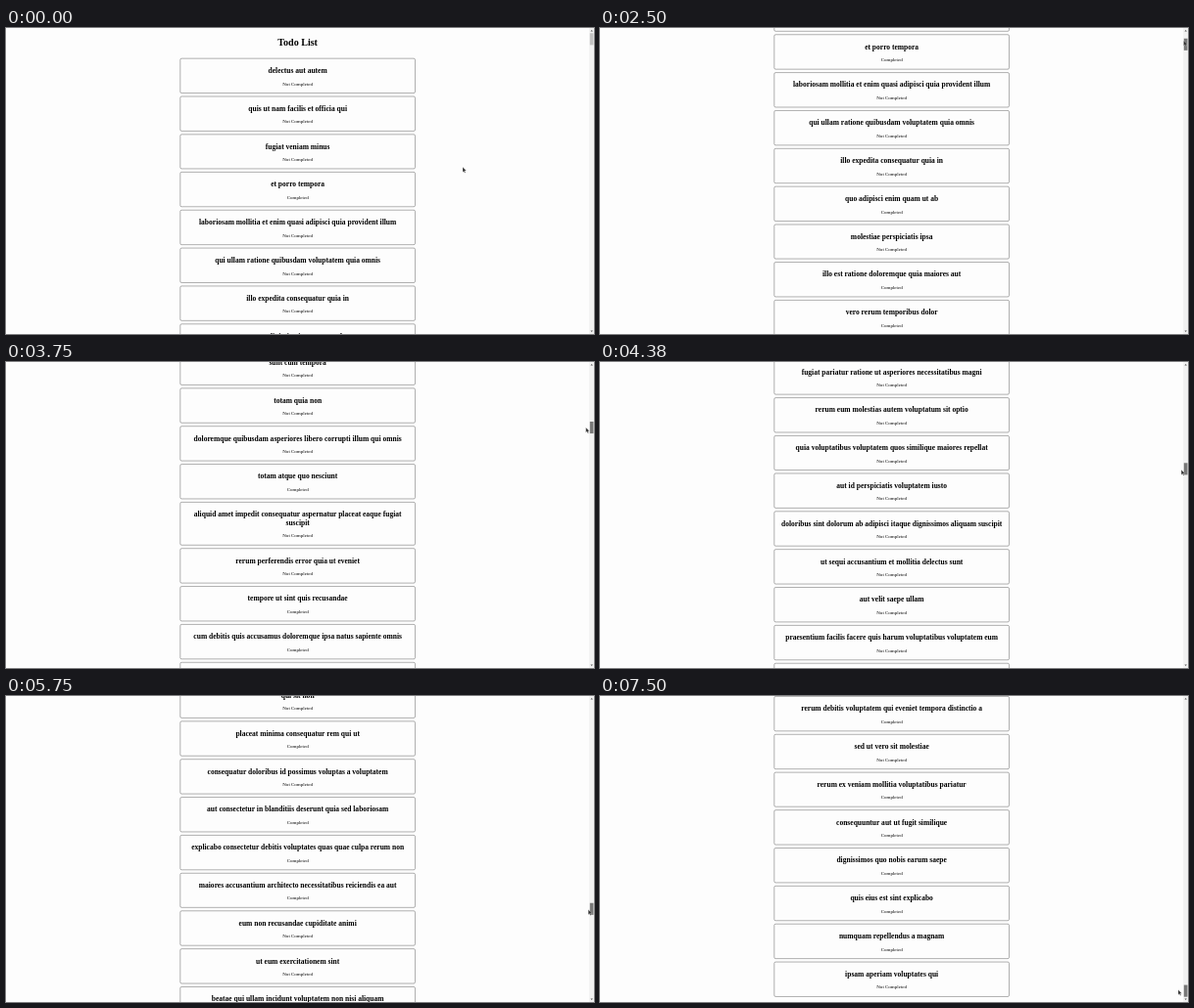
An HTML page that plays this animation: 600x313 px, repeating every 8 s.

```html
<!DOCTYPE html>
<html lang="en">
<head>
<meta charset="utf-8">
<title>Todo List</title>
<style>
  html, body { margin: 0; width: 100%; height: 100%; overflow: hidden; background: #fdfdfd; }
  #stage { position: absolute; left: 0; top: 0; width: 600px; height: 313px; overflow: hidden; }
  #page {
    position: absolute; left: 0; top: 0; width: 1900px; padding-bottom: 8px;
    display: flow-root; transform-origin: 0 0; text-align: center; color: #000;
    font: 16px/18px "Liberation Serif", "Times New Roman", serif;
  }
  h1 { margin: 29.5px 0 32.5px; font-size: 32px; line-height: 37px; }
  .todo {
    box-sizing: border-box; width: 766px; margin: 0 auto 10px; padding: 5px;
    border: 1px solid #000; border-radius: 5px; display: flow-root;
  }
  h2 { margin: 19.92px 0; font-size: 24px; line-height: 28px; }
  p { margin: 16px 0; }
  svg { position: absolute; left: 0; top: 0; }
</style>
</head>
<body>
<div id="stage">
  <div id="page"><h1>Todo List</h1></div>
  <svg width="600" height="313">
    <rect x="595.2" width="4.8" height="313" fill="#f1f1f1"/>
    <path id="up" d="M596.5 3.4l1.2-1.5 1.2 1.5z"/>
    <path d="M596.5 309.6l1.2 1.5 1.2-1.5z" fill="#505050"/>
    <rect id="thumb" x="595.8" width="3.7"/>
    <path id="cursor" d="M0 0V5.2L1.2 4.1 2 6 2.9 5.6 2.1 3.8H3.7Z" fill="#2b2b2b" stroke="#fff" stroke-width=".25"/>
  </svg>
</div>
<script>
// A leading * marks a completed todo.
const todos = `delectus aut autem
quis ut nam facilis et officia qui
fugiat veniam minus
*et porro tempora
laboriosam mollitia et enim quasi adipisci quia provident illum
qui ullam ratione quibusdam voluptatem quia omnis
illo expedita consequatur quia in
*quo adipisci enim quam ut ab
molestiae perspiciatis ipsa
*illo est ratione doloremque quia maiores aut
*vero rerum temporibus dolor
*ipsa repellendus fugit nisi
et doloremque nulla
*repellendus sunt dolores architecto voluptatum
*ab voluptatum amet voluptas
*accusamus eos facilis sint et aut voluptatem
*quo laboriosam deleniti aut qui
dolorum est consequatur ea mollitia in culpa
*molestiae ipsa aut voluptatibus pariatur dolor nihil
*ullam nobis libero sapiente ad optio sint
suscipit repellat esse quibusdam voluptatem incidunt
*distinctio vitae autem nihil ut molestias quo
et itaque necessitatibus maxime molestiae qui quas velit
adipisci non ad dicta qui amet quaerat doloribus ea
*voluptas quo tenetur perspiciatis explicabo natus
*aliquam aut quasi
*veritatis pariatur delectus
nesciunt totam sit blanditiis sit
laborum aut in quam
*nemo perspiciatis repellat ut dolor libero commodi blanditiis omnis
repudiandae totam in est sint facere fuga
earum doloribus ea doloremque quis
sint sit aut vero
porro aut necessitatibus eaque distinctio
*repellendus veritatis molestias dicta incidunt
*excepturi deleniti adipisci voluptatem et neque optio illum ad
sunt cum tempora
totam quia non
doloremque quibusdam asperiores libero corrupti illum qui omnis
*totam atque quo nesciunt
aliquid amet impedit consequatur aspernatur placeat eaque fugiat suscipit
rerum perferendis error quia ut eveniet
*tempore ut sint quis recusandae
*cum debitis quis accusamus doloremque ipsa natus sapiente omnis
velit soluta adipisci molestias reiciendis harum
vel voluptatem repellat nihil placeat corporis
nam qui rerum fugiat accusamus
sit reprehenderit omnis quia
ut necessitatibus aut maiores debitis officia blanditiis velit et
*cupiditate necessitatibus ullam aut quis dolor voluptate
distinctio exercitationem ab doloribus
nesciunt dolorum quis recusandae ad pariatur ratione
qui labore est occaecati recusandae aliquid quam
*quis et est ut voluptate quam dolor
*voluptatum omnis minima qui occaecati provident nulla voluptatem ratione
*deleniti ea temporibus enim
pariatur et magnam ea doloribus similique voluptatem rerum quia
est dicta totam qui explicabo doloribus qui dignissimos
perspiciatis velit id laborum placeat iusto et aliquam odio
*et sequi qui architecto ut adipisci
*odit optio omnis qui sunt
et placeat et tempore aspernatur sint numquam
*doloremque aut dolores quidem fuga qui nulla
voluptas consequatur qui ut quia magnam nemo esse
fugiat pariatur ratione ut asperiores necessitatibus magni
rerum eum molestias autem voluptatum sit optio
quia voluptatibus voluptatem quos similique maiores repellat
aut id perspiciatis voluptatem iusto
doloribus sint dolorum ab adipisci itaque dignissimos aliquam suscipit
ut sequi accusantium et mollitia delectus sunt
aut velit saepe ullam
praesentium facilis facere quis harum voluptatibus voluptatem eum
*sint amet quia totam corporis qui exercitationem commodi
expedita tempore nobis eveniet laborum maiores
occaecati adipisci est possimus totam
*sequi dolorem sed
maiores aut nesciunt delectus exercitationem vel assumenda eligendi at
reiciendis est magnam amet nemo iste recusandae impedit quaerat
*eum ipsa maxime ut
*tempore molestias dolores rerum sequi voluptates ipsum consequatur
*suscipit qui totam
voluptates eum voluptas et dicta
*quidem at rerum quis ex aut sit quam
sunt veritatis ut voluptate
*et quia ad iste a
*incidunt ut saepe autem
*laudantium quae eligendi consequatur quia et vero autem
vitae aut excepturi laboriosam sint aliquam et et accusantium
*sequi ut omnis et
*molestiae nisi accusantium tenetur dolorem et
*nulla quis consequatur saepe qui id expedita
*in omnis laboriosam
*odio iure consequatur molestiae quibusdam necessitatibus quia sint
facilis modi saepe mollitia
*vel nihil et molestiae iusto assumenda nemo quo ut
nobis suscipit ducimus enim asperiores voluptas
dolorum laboriosam eos qui iure aliquam
*debitis accusantium ut quo facilis nihil quis sapiente necessitatibus
neque voluptates ratione
excepturi a et neque qui expedita vel voluptate
explicabo enim cumque porro aperiam occaecati minima
sed ab consequatur
non sunt delectus illo nulla tenetur enim omnis
excepturi non laudantium quo
*totam quia dolorem et illum repellat voluptas optio
*ad illo quis voluptatem temporibus
praesentium facilis omnis laudantium fugit ad iusto nihil nesciunt
*a eos eaque nihil et exercitationem incidunt delectus
*autem temporibus harum quisquam in culpa
*aut aut ea corporis
magni accusantium labore et id quis provident
consectetur impedit quisquam qui deserunt non rerum consequuntur eius
quia atque aliquam sunt impedit voluptatum rerum assumenda nisi
cupiditate quos possimus corporis quisquam exercitationem beatae
sed et ea eum
*ipsa dolores vel facilis ut
sequi quae est et qui qui eveniet asperiores
quia modi consequatur vero fugiat
corporis ducimus ea perspiciatis iste
dolorem laboriosam vel voluptas et aliquam quasi
*inventore aut nihil minima laudantium hic qui omnis
*provident aut nobis culpa
esse et quis iste est earum aut impedit
qui consectetur id
aut quasi autem iste tempore illum possimus
*ut asperiores perspiciatis veniam ipsum rerum saepe
*voluptatem libero consectetur rerum ut
eius omnis est qui voluptatem autem
rerum culpa quis harum
*nulla aliquid eveniet harum laborum libero alias ut unde
qui ea incidunt quis
*qui molestiae voluptatibus velit iure harum quisquam
*et labore eos enim rerum consequatur sunt
molestiae doloribus et laborum quod ea
facere ipsa nam eum voluptates reiciendis vero qui
asperiores illo tempora fuga sed ut quasi adipisci
qui sit non
*placeat minima consequatur rem qui ut
consequatur doloribus id possimus voluptas a voluptatem
*aut consectetur in blanditiis deserunt quia sed laboriosam
*explicabo consectetur debitis voluptates quas quae culpa rerum non
*maiores accusantium architecto necessitatibus reiciendis ea aut
eum non recusandae cupiditate animi
ut eum exercitationem sint
beatae qui ullam incidunt voluptatem non nisi aliquam
*molestiae suscipit ratione nihil odio libero impedit vero totam
*eum itaque quod reprehenderit et facilis dolor autem ut
esse quas et quo quasi exercitationem
animi voluptas quod perferendis est
eos amet tempore laudantium fugit a
*accusamus adipisci dicta qui quo ea explicabo sed vero
odit eligendi recusandae doloremque cumque non
ea aperiam consequatur qui repellat eos
*rerum non ex sapiente
*voluptatem nobis consequatur et assumenda magnam
*nam quia quia nulla repellat assumenda quibusdam sit nobis
*dolorem veniam quisquam deserunt repellendus
*debitis vitae delectus et harum accusamus aut deleniti a
*debitis adipisci quibusdam aliquam sed dolore ea praesentium nobis
et praesentium aliquam est
*ex hic consequuntur earum omnis alias ut occaecati culpa
*omnis laboriosam molestias animi sunt dolore
natus corrupti maxime laudantium et voluptatem laboriosam odit
reprehenderit quos aut aut consequatur est sed
fugiat perferendis sed aut quidem
quos quo possimus suscipit minima ut
et quis minus quo a asperiores molestiae
recusandae quia qui sunt libero
*ea odio perferendis officiis
quisquam aliquam quia doloribus aut
*fugiat aut voluptatibus corrupti deleniti velit iste odio
et provident amet rerum consectetur et voluptatum
harum ad aperiam quis
similique aut quo
*laudantium eius officia perferendis provident perspiciatis asperiores
magni soluta corrupti ut maiores rem quidem
et placeat temporibus voluptas est tempora quos quibusdam
*nesciunt itaque commodi tempore
*omnis consequuntur cupiditate impedit itaque ipsam quo
*debitis nisi et dolorem repellat et
ut cupiditate sequi aliquam fuga maiores
*inventore saepe cumque et aut illum enim
*omnis nulla eum aliquam distinctio
molestias modi perferendis perspiciatis
voluptates dignissimos sed doloribus animi quaerat aut
explicabo odio est et
consequuntur animi possimus
*vel non beatae est
*culpa eius et voluptatem et
*accusamus sint iusto et voluptatem exercitationem
*temporibus atque distinctio omnis eius impedit tempore molestias pariatur
ut quas possimus exercitationem sint voluptates
*rerum debitis voluptatem qui eveniet tempora distinctio a
sed ut vero sit molestiae
*rerum ex veniam mollitia voluptatibus pariatur
*consequuntur aut ut fugit similique
*dignissimos quo nobis earum saepe
*quis eius est sint explicabo
*numquam repellendus a magnam
ipsam aperiam voluptates qui`.split('\n');

const SCALE = 0.3133, VIEW = 313, ARROW = 5.3, LOOP = 8000, STEP = 125;
const $ = id => document.getElementById(id);
const page = $('page'), thumb = $('thumb'), cursor = $('cursor'), up = $('up');

function add(parent, tag, text = '') {
  const el = document.createElement(tag);
  el.textContent = text;
  return parent.appendChild(el);
}

const cards = todos.map(line => {
  const card = add(page, 'div');
  card.className = 'todo';
  add(card, 'h2', line.replace('*', ''));
  add(card, 'p', line[0] === '*' ? 'Completed' : 'Not Completed');
  return card;
});

const pageHeight = page.offsetHeight * SCALE, maxScroll = pageHeight - VIEW;
const track = VIEW - 2 * ARROW, thumbHeight = track * VIEW / pageHeight;

// [time, todo number, where its top edge stands on the stage]
const scrollKeys = [
  [2250, 1, 31], [2375, 1, -29], [2500, 4, 6.6], [3750, 38, 26.7], [5000, 98, 29.8],
  [5750, 138, 25.7], [6250, 164, 8], [7500, 200, 271.9]
].map(([time, n, y]) => [time, cards[n - 1].offsetTop * SCALE - y]);

// [time, x, y] of the pointer tip
const cursorKeys = [
  [250, 466, 142.3], [750, 510, 90], [1125, 562, 26], [1625, 592, 9.3], [1750, 592, 9.3],
  [1875, 595, 10], [2000, 595.6, 10], [2250, 595.6, 10], [2500, 595.6, 13], [3750, 591.7, 67],
  [5000, 594.6, 158.8], [5750, 594.2, 218.5], [6250, 592, 256.8], [7500, 590, 300.5]
];

// Smooth curve through the keys, flat at turning points and both ends.
function curve(keys, time, col) {
  const last = keys.length - 1;
  if (time <= keys[0][0]) return keys[0][col];
  if (time >= keys[last][0]) return keys[last][col];
  const slope = (a, b) => (keys[b][col] - keys[a][col]) / (keys[b][0] - keys[a][0]);
  const tangent = k => k === 0 || k === last || slope(k - 1, k) * slope(k, k + 1) <= 0
    ? 0 : slope(k - 1, k + 1);
  const i = keys.findIndex(key => key[0] > time) - 1;
  const span = keys[i + 1][0] - keys[i][0], u = (time - keys[i][0]) / span, v = 1 - u;
  return v * v * (1 + 2 * u) * keys[i][col] + u * u * (1 + 2 * v) * keys[i + 1][col]
    + span * u * v * (v * tangent(i) - u * tangent(i + 1));
}

function draw() {
  const time = Math.floor(performance.now() % LOOP / STEP) * STEP;
  const scroll = Math.min(maxScroll, Math.max(0, curve(scrollKeys, time, 1)));
  page.style.transform = `translateY(${-scroll}px) scale(${SCALE})`;
  thumb.setAttribute('y', ARROW + (track - thumbHeight) * scroll / maxScroll);
  thumb.setAttribute('height', thumbHeight);
  thumb.setAttribute('fill', time < 1875 ? '#c1c1c1' : time < 2000 ? '#a8a8a8' : '#787878');
  up.setAttribute('fill', scroll > 0 ? '#505050' : '#a3a3a3');
  cursor.setAttribute('transform',
    `translate(${curve(cursorKeys, time, 1)} ${curve(cursorKeys, time, 2)})`);
  requestAnimationFrame(draw);
}
draw();
</script>
</body>
</html>
```
